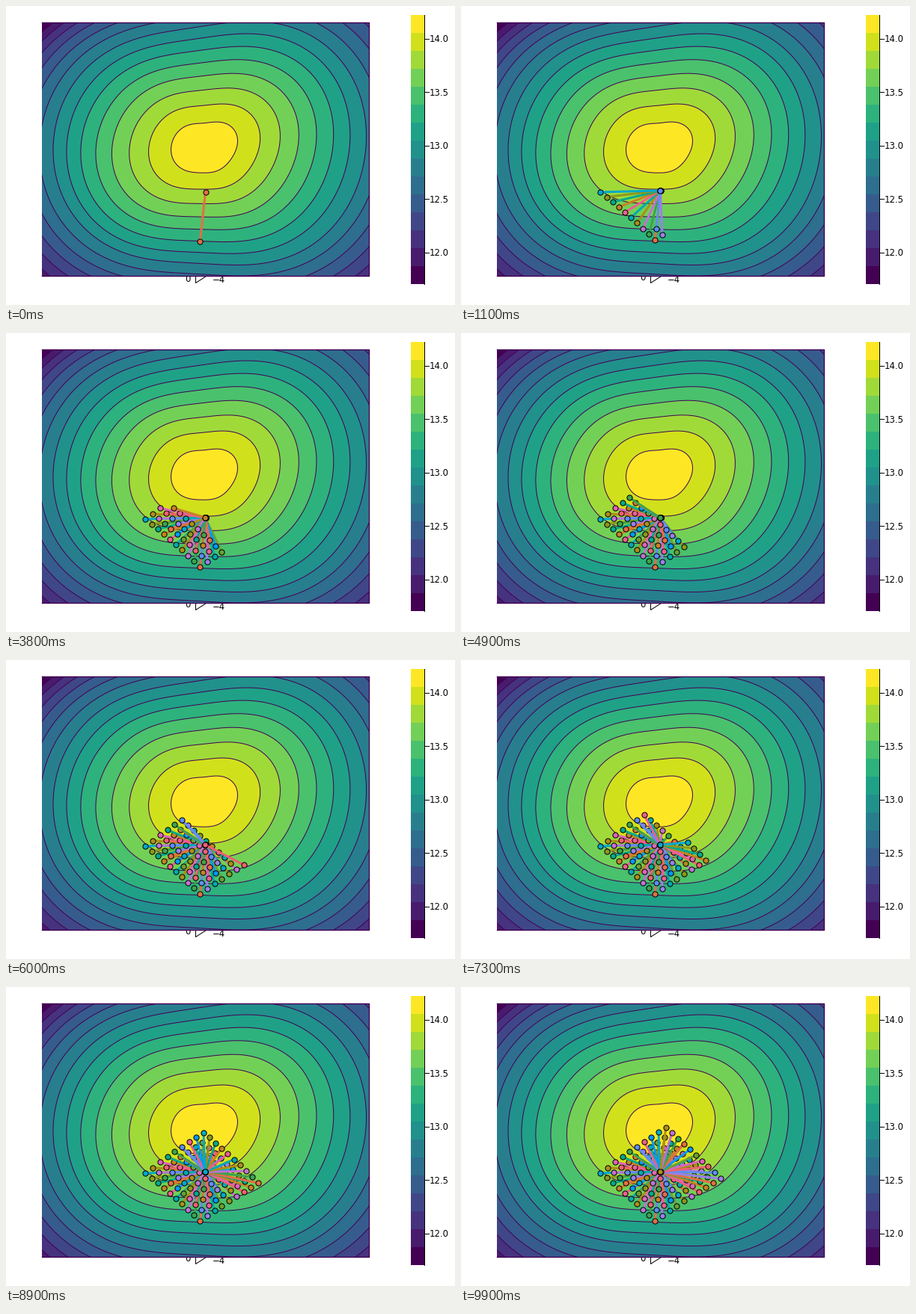
A matplotlib script that plays this animation: 600 by 400 pixels, repeating every 10 s.

```python
import numpy as np
import matplotlib.pyplot as plt
from matplotlib.animation import FuncAnimation
from matplotlib.patches import Polygon, Rectangle

W, H, DPI = 600, 400, 100
PX = 72 / DPI
FRAMES, SIDE = 100, 10
PALETTE = ["#009afa", "#e26f47", "#3da44d", "#c271d2", "#ac8e18", "#00aaae",
           "#ed5e93", "#c68225", "#00a98d", "#8e971e", "#00a9cc", "#9b7fe9",
           "#618df6", "#f06073", "#dd65b6", "#6c9f33"]
LEFT, TOP, RIGHT, BOTTOM = 47.5, 21.5, 485, 361
BANDS = 15
LINE = "#440154"

fig = plt.figure(figsize=(W / DPI, H / DPI), dpi=DPI, facecolor="white")
ax = fig.add_axes([0, 0, 1, 1])
ax.set(xlim=(0, W), ylim=(H, 0))
ax.axis("off")
viridis = plt.get_cmap("viridis")


def band(i):
    return viridis(i / (BANDS - 1))


def label(x, y, s, ha="left", z=6):
    return ax.text(x, y, s, family="DejaVu Sans", size=11.6 * PX, ha=ha,
                   va="center_baseline", color="black", zorder=z)


def contour(level, n=240):
    """Closed curve: a power-law radius shaped by a few angular harmonics."""
    t = np.linspace(0, 2 * np.pi, n, endpoint=False)
    q = min(level, 8)
    shape = (1 + (0.0075 * q - 0.01) * np.cos(t) - 0.025 * np.sin(t)
             + 0.133 * np.cos(2 * t) + (0.005 * q - 0.065) * np.sin(2 * t)
             - 0.013 * np.cos(3 * t) - 0.03 / q * np.sin(3 * t)
             - 0.02 * np.cos(4 * t) + (0.0025 * q - 0.022) * np.sin(4 * t))
    # The outer rings crowd together towards the upper left corner.
    squeeze = 0.6 * (level - q) ** 2 * np.maximum(np.cos(t - 3.8), 0)
    r = 39.3 * level ** 0.752 * shape - squeeze
    return np.column_stack([265 + r * np.cos(t), 189.7 + r * np.sin(t)])


area = Rectangle((LEFT, TOP), RIGHT - LEFT, BOTTOM - TOP, fc=band(0), ec="none", zorder=2)
ax.add_patch(area)
for level in range(BANDS - 1, 0, -1):
    ring = Polygon(contour(level), fc=band(BANDS - level), ec=LINE, lw=1 * PX, zorder=3)
    ax.add_patch(ring)
    ring.set_clip_path(area)
ax.plot([LEFT, RIGHT, RIGHT, LEFT], [TOP, TOP, BOTTOM, BOTTOM],
        color=LINE, lw=1.4 * PX, zorder=4)

# Axis remains showing below the surface
ax.plot([253.5, 253.5, 267.5], [360, 370.5, 361.5], color="black", lw=1 * PX, zorder=1)
zero = label(243, 361.7, "0", "center", 1)
label(275.5, 364.7, "\u22124", z=1)

# Colour bar
BAR_X, BAR_TOP, BAR_H = 540.5, 12, 359.5
step = BAR_H / BANDS
for i in range(BANDS):
    ax.add_patch(Rectangle((BAR_X, BAR_TOP + BAR_H - (i + 1) * step), 18, step,
                           fc=band(i), ec="none", antialiased=False))
ax.plot([558.5] * 2, [BAR_TOP, BAR_TOP + BAR_H], color="black", lw=1 * PX)
for i in range(5):
    y = 43.5 + 71.5 * i
    ax.plot([558.5, 564.5], [y, y], color="black", lw=1 * PX)
    label(566, y - 0.4, f"{14 - i / 2:.1f}")

# Starting points: a 10 x 10 grid on a shallow bowl, seen in projection
j, i = np.divmod(np.arange(FRAMES), SIDE)
start_x = 259.3 + 9.7 * j - 8.1 * i
start_y = 313 - 7 * j - 7.75 * i + 0.08 * j**2 + 0.07 * i**2 - 0.05 * i * j

# The view rises whenever a new point extends the range of heights.
dj, di = j - 4.6, i - 4.65
depth = np.maximum.accumulate(0.08 * dj**2 + 0.07 * di**2 - 0.05 * di * dj)
sags = 1.15 * (depth[-1] - depth)

rng = np.random.default_rng(4)
end_x, end_y = np.array([[266.2], [247]]) + rng.uniform(-0.35, 0.35, (2, FRAMES))

paths = []
for k in range(FRAMES):
    path, = ax.plot([start_x[k], end_x[k]], [start_y[k], end_y[k]],
                    color=PALETTE[(k + 1) % len(PALETTE)], lw=3 * PX,
                    marker="o", ms=7.2 * PX, mec="black", mew=1 * PX, zorder=10 + k)
    paths.append(path)


def update(frame):
    sag = sags[frame]
    zero.set_y(361.7 + sag)
    for k, path in enumerate(paths):
        path.set_visible(k <= frame)
        path.set_ydata([start_y[k] + sag, end_y[k] + sag])


anim = FuncAnimation(fig, update, frames=FRAMES, interval=100, repeat=True, repeat_delay=0)
plt.show()
```
